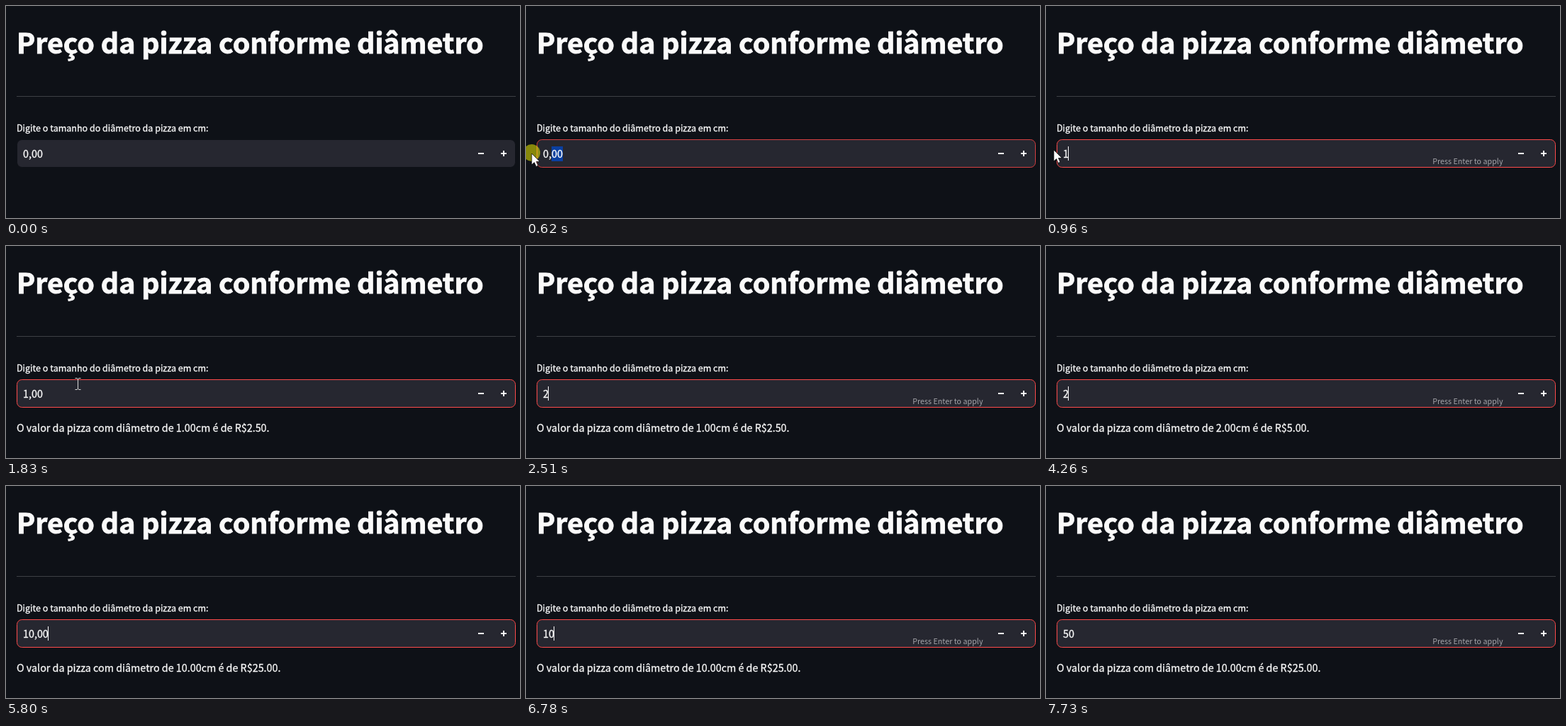
An HTML page for the animation above (8000 ms loop, 725x299 px).

```html
<!DOCTYPE html>
<html lang="pt">
<head>
<meta charset="utf-8">
<title>Preço da pizza</title>
<style>
  html, body { margin: 0; width: 100%; height: 100%; overflow: hidden; background: #0e1117; }
  svg { display: block; }
  text {
    font: 14.33px "Noto Sans CJK JP", "Noto Sans CJK SC", "Noto Sans CJK", "Noto Sans", sans-serif;
    fill: #fafafa;
    stroke: #fafafa;
    stroke-width: .3px;
    white-space: pre;
  }
  #title { font-size: 39.4px; font-weight: 700; letter-spacing: -0.001em; stroke-width: .9px; }
  #label { font-size: 12.53px; }
  #hint { font-size: 10.74px; fill: #a5a5aa; stroke: none; }
</style>
</head>
<body>
<svg width="725" height="299" viewBox="0 0 725 299">
  <g id="page">
    <text id="title" x="15" y="67.3">Preço da pizza conforme diâmetro</text>
    <path d="M15 127.5H719" stroke="#3d4045"/>
    <text id="label" x="15" y="177">Digite o tamanho do diâmetro da pizza em cm:</text>
    <text id="result" x="15" y="262"></text>
  </g>
  <rect x="15.5" y="188.5" width="703" height="39" rx="7" fill="#262730" stroke="#0e1117"/>
  <rect id="border" x="15.5" y="188.5" width="703" height="39" rx="7" fill="none" stroke="#ff4b4b"/>
  <rect id="selection" y="198" height="21" fill="#0b3fa0"/>
  <text id="value" x="24" y="214"></text>
  <rect id="caret" y="198" width="1" height="20" fill="#fafafa"/>
  <text id="hint" x="644.5" y="223" text-anchor="end">Press Enter to apply</text>
  <path d="M666 208H674M698 208H706M702 204V212" stroke="#fafafa" stroke-width="2"/>
  <g id="mouse">
    <circle id="press" cx="0" cy="-1" r="12" fill="#ff0" fill-opacity=".5"/>
    <path id="arrow" d="M0 0V16L3.7 12.6L6.3 18.4L9 17.2L6.5 11.5H11.5Z" fill="#fff" stroke="#000" stroke-width=".7"/>
    <path id="beam" d="M-3.5 -7.5H-1L.5 -6.5L2 -7.5H4.5M.5 -6.5V7.5M-3.5 8.5H-1L.5 7.5L2 8.5H4.5" fill="none" stroke="#d8d8d8"/>
  </g>
</svg>
<script>
const LOOP = 8000;
const $ = id => document.getElementById(id);
const show = (id, on) => $(id).setAttribute('visibility', on ? 'visible' : 'hidden');

// time, text, caret shown, hint shown
const typing = [
  [0, '0,00', 0, 0],
  [960, '1', 1, 1],
  [1290, '1,00', 1, 0],
  [1830, '1,00', 0, 0],
  [2510, '2', 1, 1],
  [3040, '2,00', 0, 0],
  [3130, '2,00', 1, 0],
  [3660, '2,00', 0, 0],
  [3990, '2,0', 1, 1],
  [4130, '2,', 1, 1],
  [4260, '2', 1, 1],
  [4390, '', 1, 1],
  [4720, '1', 1, 1],
  [4930, '10', 1, 1],
  [5070, '100', 1, 1],
  [5530, '10', 1, 1],
  [5800, '10,00', 1, 0],
  [6320, '10,0', 1, 1],
  [6520, '10,', 1, 1],
  [6650, '10', 1, 1],
  [6790, '1', 1, 1],
  [6920, '', 1, 1],
  [7120, '5', 1, 1],
  [7200, '50', 1, 1],
  [7730, '50', 0, 1]
];

// time, diameter
const results = [[0, 0], [1290, 1], [3200, 2], [5800, 10]];

// time, x, y, shape, button held
const moves = [
  [0, -40, 260, 'arrow', 0],
  [130, 128, 252, 'arrow', 0],
  [200, 96, 232, 'arrow', 0],
  [270, 76, 216, 'beam', 0],
  [340, 64, 210, 'beam', 0],
  [410, 60, 209, 'beam', 0],
  [480, 56, 209, 'beam', 1],
  [550, 38, 209, 'beam', 1],
  [620, 8, 208, 'arrow', 1],
  [690, 8, 206, 'arrow', 1],
  [760, 11, 203, 'arrow', 0],
  [1690, 48, 200, 'beam', 0],
  [1760, 86, 193, 'beam', 0],
  [1830, 101, 194, 'beam', 0],
  [2030, 84, 202, 'beam', 0],
  [2100, 66, 208, 'beam', 0],
  [2170, 56, 209, 'beam', 1],
  [2240, 38, 209, 'beam', 1],
  [2310, 10, 208, 'arrow', 1],
  [2380, 2, 206, 'arrow', 0],
  [2510, -40, 206, 'arrow', 0]
];

// time, left edge of the selection (52 = none)
const selections = [[0, 52], [550, 44], [620, 36], [690, 24], [960, 52],
                    [2240, 36], [2310, 24], [2510, 52]];

const at = (table, t) => table.findLast(row => row[0] <= t);
const width = s => [...s].reduce((w, c) => w + (c === ',' ? 4 : 8), 0);

function resultText(cm) {
  return cm ? `O valor da pizza com diâmetro de ${cm.toFixed(2)}cm é de R$${(cm * 2.5).toFixed(2)}.` : '';
}

function setText(id, s) {
  if ($(id).textContent !== s) $(id).textContent = s;
}

function draw(t) {
  const [, text, caret, hint] = at(typing, t);
  setText('value', text);
  show('caret', caret);
  $('caret').setAttribute('x', 24 + Math.max(0, width(text) - 1));
  show('hint', hint);
  setText('result', resultText(at(results, t)[1]));

  // the page dims briefly while it recalculates
  $('page').setAttribute('opacity', t >= 3130 && t < 3200 ? 0.98 : 1);
  $('border').setAttribute('opacity', Math.min(1, Math.max(0, (t - 430) / 230)));

  const left = at(selections, t)[1];
  $('selection').setAttribute('x', left);
  $('selection').setAttribute('width', 52 - left);

  const [, x, y, shape, held] = at(moves, t);
  $('mouse').setAttribute('transform', `translate(${x} ${y})`);
  show('arrow', shape === 'arrow');
  show('beam', shape === 'beam');
  show('press', held);
}

const start = performance.now();
function tick() {
  draw((performance.now() - start) % LOOP);
  requestAnimationFrame(tick);
}
tick();
</script>
</body>
</html>
```
